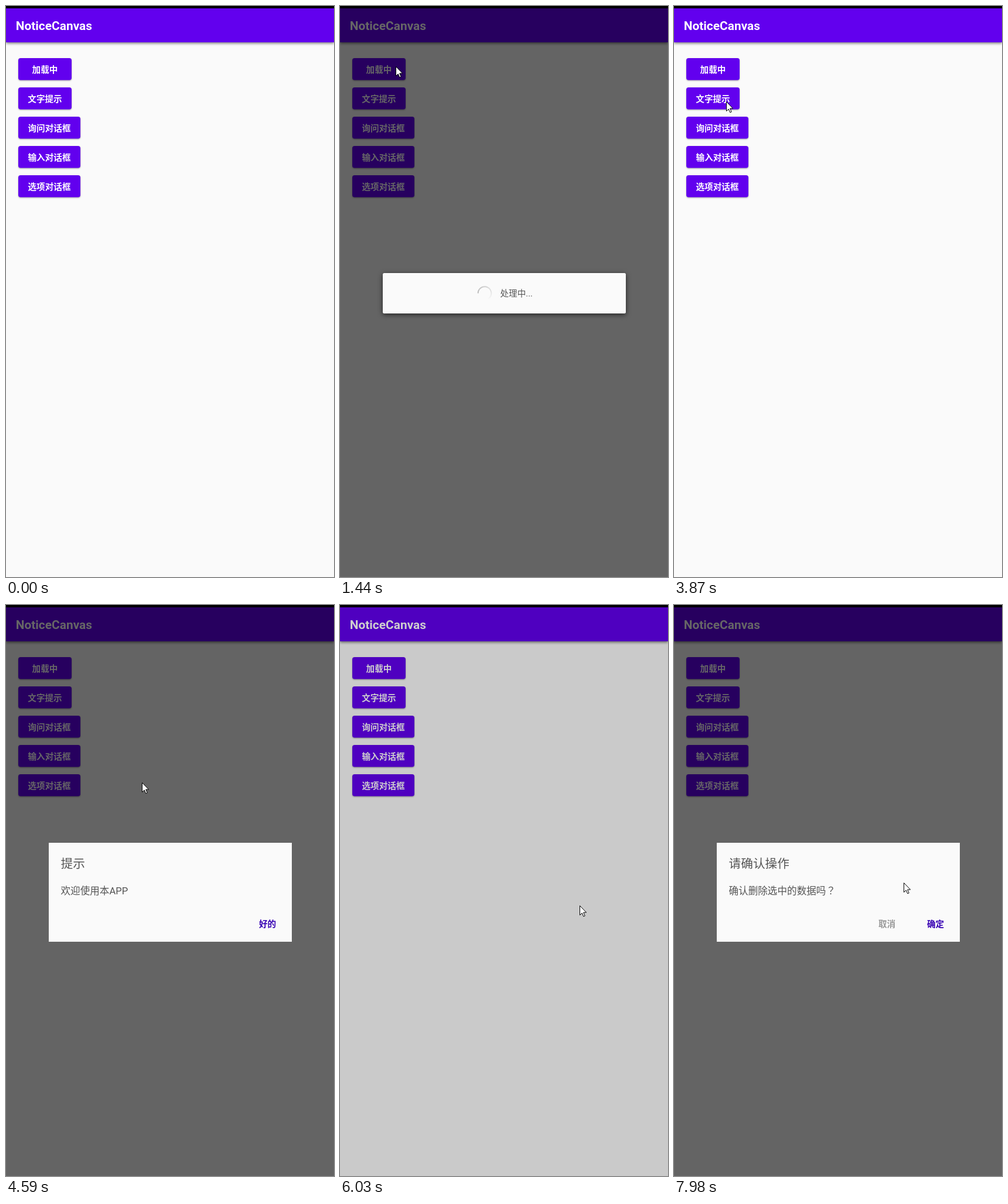
Write an HTML page that moves like this. It is 560 by 975 pixels and loops after 8000 ms.

```html
<!DOCTYPE html>
<html lang="zh-CN">
<head>
<meta charset="utf-8">
<title>NoticeCanvas</title>
<style>
  html, body { margin: 0; width: 100%; height: 100%; overflow: hidden; background: #fafafa; }
  svg { display: block; width: 560px; height: 975px; }
  text { font: 14.6px Roboto, "Noto Sans CJK SC", "Noto Sans CJK", sans-serif; fill: #555; }
  .mid { text-anchor: middle; font-weight: 700; }
  .bar { fill: #6200ee; filter: drop-shadow(0 2px 2px rgba(0, 0, 0, .5)); }
  .btn { fill: #6200ee; filter: drop-shadow(0 1px 1px rgba(0, 0, 0, .35)); }
  .label, .title { fill: #fff; }
  .title { font-size: 20.9px; font-weight: 600; }
  .press { fill: #fff; opacity: 0; }
  .dialog { opacity: 0; }
  .card { fill: #fafafa; }
  .raised { filter: drop-shadow(0 2px 4px rgba(0, 0, 0, .65)); }
  .head { font-size: 20.7px; }
  .body { font-size: 16.6px; }
  .mark { font-family: "Noto Sans CJK TC", "Noto Sans CJK", sans-serif; }
  .ok { fill: #3700b3; }
  .cancel { fill: #999; }
</style>
</head>
<body>
<svg viewBox="0 0 560 975">
  <rect width="560" height="975" fill="#fafafa"/>
  <rect class="bar" y="4" width="560" height="58"/>
  <text class="title" x="16.7" y="41.4">NoticeCanvas</text>
  <g id="buttons"></g>
  <rect id="dim" y="4" width="560" height="971" opacity="0"/>

  <g class="dialog">
    <rect class="card raised" x="73" y="456" width="415" height="69" rx="2.5"/>
    <g id="spinner" fill="none" stroke="#a8a8a8" stroke-width="1.9"></g>
    <text x="273.5" y="496.4">处理中...</text>
  </g>
  <g class="dialog">
    <rect class="card" x="73" y="406" width="415" height="169"/>
    <text class="head" x="93.5" y="449.3">提示</text>
    <text class="body" x="93.5" y="493.5">欢迎使用本APP</text>
    <text class="mid ok" x="446.5" y="550">好的</text>
  </g>
  <g class="dialog">
    <rect class="card" x="73" y="406" width="415" height="169"/>
    <text class="head" x="93.5" y="449.3">请确认操作</text>
    <text class="body" x="93.5" y="493.5">确认删除选中的数据吗<tspan class="mark" lang="zh-TW">？</tspan></text>
    <text class="mid cancel" x="363.5" y="550">取消</text>
    <text class="mid ok" x="446.5" y="550">确定</text>
  </g>

  <rect width="560" height="4"/>
  <path id="cursor" d="M.5 .5V16.5L4.2 13 6.8 18.8 9.2 17.8 6.7 12H11.6Z" fill="#fff" stroke="#000" stroke-linejoin="round"/>
</svg>
<script>
const LOOP = 8000, STEP = 30, DIM = .6;
const $ = id => document.getElementById(id);
const ramp = (t, from, length) => Math.min(1, Math.max(0, (t - from) / length));

const labels = ['加载中', '文字提示', '询问对话框', '输入对话框', '选项对话框'];
$('buttons').innerHTML = labels.map((label, i) => {
  const y = 89 + i * 50, w = label.length > 4 ? 106 : 91;
  const box = `x="21" y="${y}" width="${w}" height="37.5" rx="4"`;
  return `<rect class="btn" ${box}/><rect class="press" ${box}/>
    <text class="mid label" x="${21 + w / 2}" y="${y + 24.6}">${label}</text>`;
}).join('');

// The ring fades clockwise from its head over 240 degrees.
const SEGMENTS = 30, ARC = 8 * Math.PI / 180;
const point = a => `${11.3 * Math.cos(a)} ${11.3 * Math.sin(a)}`;
$('spinner').innerHTML = Array.from({ length: SEGMENTS }, (_, i) =>
  `<path d="M${point(i * ARC)}A11.3 11.3 0 0 1 ${point((i + 1) * ARC)}" opacity="${.85 * (1 - i / SEGMENTS)}"/>`
).join('');

const presses = document.querySelectorAll('.press');
const dialogs = document.querySelectorAll('.dialog');

// press: button reacts, open: dialog enters, close: dialog leaves
const visits = [
  { press: 840, open: 1050, close: 2830 },
  { press: 4050, open: 4290, close: 5840 },
  { press: 6930, open: 7140, close: Infinity }
];

// Each move slows into its stop; bend bows the line sideways.
const entry = { x: 526, y: 128 };
const moves = [
  { from: 120, to: 630, x: 95, y: 103, bend: -52 },
  { from: 1470, to: 1950, x: 246, y: 320, bend: 0 },
  { from: 3390, to: 3870, x: 89, y: 163, bend: 0 },
  { from: 4365, to: 5280, x: 452, y: 549, bend: 9 },
  { from: 5970, to: 6800, x: 101, y: 204, bend: 10 },
  { from: 7410, to: 8200, x: 422, y: 502, bend: 0 }
];

function cursorAt(t) {
  let { x, y } = entry;
  for (const m of moves) {
    const k = Math.sin(ramp(t, m.from, m.to - m.from) * Math.PI / 2);
    const dx = m.x - x, dy = m.y - y;
    const bow = 4 * k * (1 - k) * m.bend / Math.hypot(dx, dy);
    x += dx * k + dy * bow;
    y += dy * k - dx * bow;
    if (k < 1) break;
  }
  return [Math.round(x), Math.round(y)];
}

function draw(t) {
  let dim = 0;
  visits.forEach(({ press, open, close }, i) => {
    const enter = ramp(t, open - 10, 220), leave = ramp(t, close, 150);
    const scale = .9 + .1 * (1 - (1 - enter) ** 2) - .1 * leave;
    dim += DIM * (enter - ramp(t, close + 40, 220));
    dialogs[i].style.opacity = ramp(t, open - 10, 150) * (1 - leave);
    dialogs[i].setAttribute('transform', `translate(280.5 490.5) scale(${scale}) translate(-280.5 -490.5)`);
    presses[i].style.opacity = t < press ? 0 : .14 * (1 - ramp(t, open, 180));
  });
  $('dim').setAttribute('opacity', dim);
  $('spinner').setAttribute('transform', `translate(247 490.5) rotate(${180 + (t - 1440) * .3})`);

  $('cursor').style.display = t < moves[0].from ? 'none' : '';
  $('cursor').setAttribute('transform', `translate(${cursorAt(t)})`);
}

const start = performance.now();
function tick() {
  const t = (performance.now() - start) % LOOP;
  draw(Math.floor(t / STEP) * STEP);
  requestAnimationFrame(tick);
}
tick();
</script>
</body>
</html>
```
